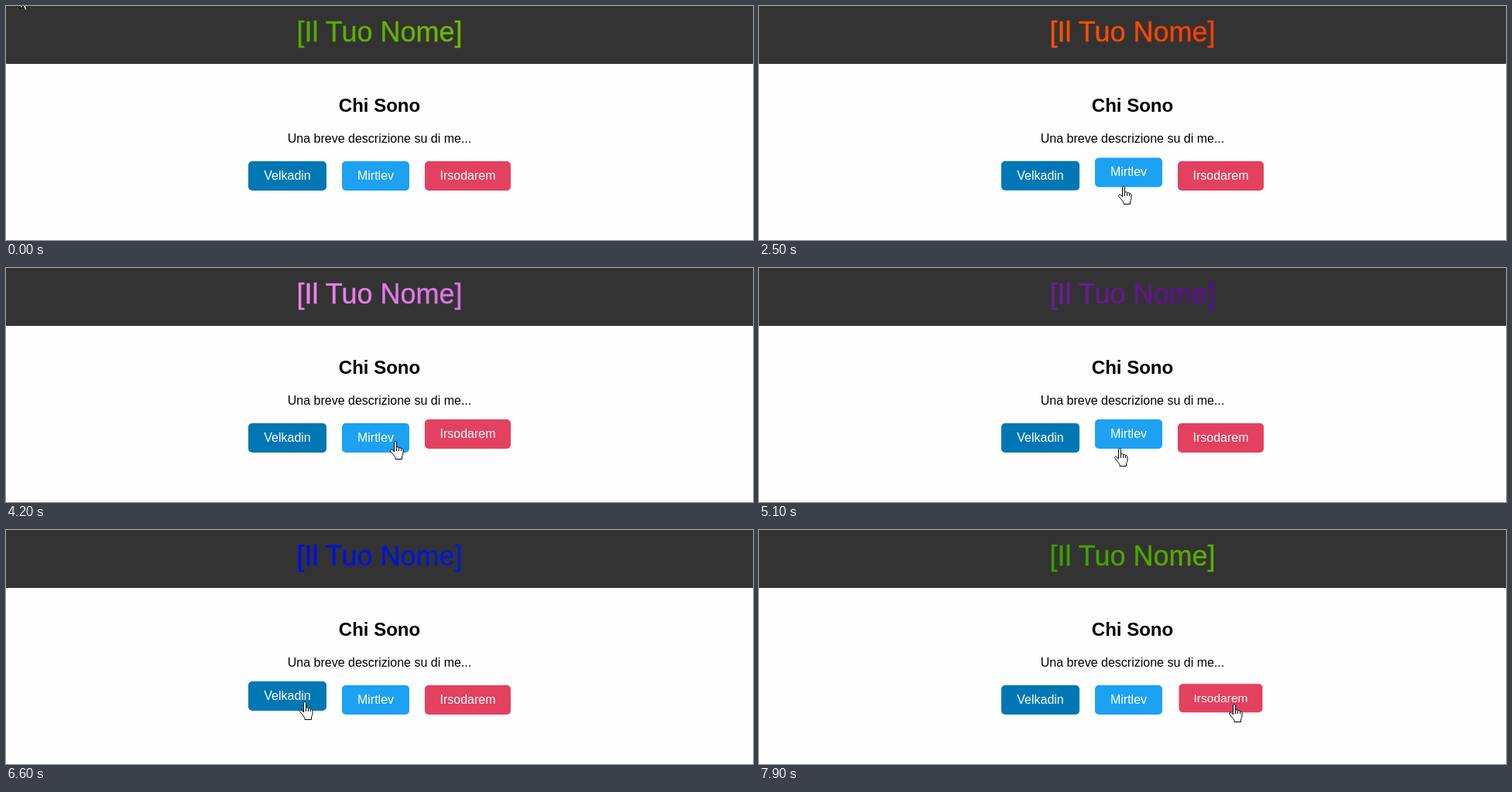
Write an HTML page that moves like this. It is 965 px wide and 303 px high and loops after 8000 ms.

```html
<!DOCTYPE html>
<html lang="it">
<head>
<meta charset="utf-8">
<title>Chi Sono</title>
<style>
  html, body { margin: 0; width: 100%; height: 100%; overflow: hidden; background: #fefefe; }
  svg { display: block; width: 965px; height: 303px; }
  text { font-family: "Liberation Sans", Arial, sans-serif; text-anchor: middle; }
  .title { font-size: 36px; fill: url(#rainbow); stroke: url(#rainbow); stroke-width: .4; }
  .button text { font-size: 16px; fill: #fff; }
  .cursor path { fill: #fff; stroke: #000; stroke-linejoin: round; }
</style>
</head>
<body>
<svg viewBox="0 0 965 303">
  <defs>
    <linearGradient id="rainbow" gradientUnits="userSpaceOnUse" spreadMethod="repeat" y1="0" y2="0"></linearGradient>
  </defs>
  <rect width="965" height="75" fill="#333"/>
  <text class="title" x="482.5" y="46">[Il Tuo Nome]</text>
  <text x="482.5" y="137" font-size="24" font-weight="bold">Chi Sono</text>
  <text x="482.5" y="177" font-size="16">Una breve descrizione su di me...</text>
  <g id="buttons"></g>
  <g class="cursor" id="arrow">
    <path d="M.5 .5V16.5L4.2 13 6.7 18.7 9.2 17.6 6.8 12H11.7Z"/>
  </g>
  <g class="cursor" id="hand">
    <path d="M5.5 14V2.2C5.5 -.1 8.5 -.1 8.5 2.2V8.5C9 7.3 11.5 7.6 11.5 9.3 12 8 14.5 8.5 14.5 10.2 15 9.2 17 10 17 11.5V15.5C17 18 15.5 19 15.5 21V23.5H7V21.5C6 19.5 2 15 .8 13.2 0 11.5 2 10.2 3.5 11.8Z"/>
    <path d="M8.5 8.5V13M11.5 9.3V13M14.5 10.2V13"/>
  </g>
</svg>
<script>
const NS = "http://www.w3.org/2000/svg";
const LOOP = 8000, STEP = 100, TRANSITION = 300, HOVER_LAG = 50;
const COLORS = ["green", "yellow", "orange", "red", "violet", "indigo", "blue", "green"];
const SPAN = COLORS.length - 1, STOP_WIDTH = 1600;
const BUTTON_Y = 220, BUTTON_HEIGHT = 38, GAP = 20;

// Button states
const REST = { y: 0, scale: 1 }, HOVER = { y: -5, scale: 1 }, PRESS = { y: 0, scale: 0.95 };

const buttons = [
  { label: "Velkadin", width: 101, color: "#0077b5" },
  { label: "Mirtlev", width: 87, color: "#1da1f2", press: [5340, 5680] },
  { label: "Irsodarem", width: 111, color: "#e4405f", press: [7805, LOOP] }
];

// Pointer moves; it rests between them
const START = [18, -13];
const moves = [
  { from: 0, to: 600, at: [175, 204] },
  { from: 600, to: 900, at: [220, 178] },
  { from: 1000, to: 1500, at: [395, 227] },
  { from: 2150, to: 2350, at: [470, 233] },
  { from: 2900, to: 3400, at: [590, 225] },
  { from: 4040, to: 4330, at: [438, 224] },
  { from: 4500, to: 5300, at: [470, 235] },
  { from: 5340, to: 5560, at: [470, 272] },
  { from: 5900, to: 6550, at: [385, 222] },
  { from: 6820, to: 7060, at: [513, 218] },
  { from: 7130, to: 7450, at: [613, 225] }
];

const $ = id => document.getElementById(id);
const clamp = x => Math.min(1, Math.max(0, x));
const smooth = x => x * x * (3 - 2 * x);

function add(parent, tag, attrs, text = "") {
  const el = document.createElementNS(NS, tag);
  for (const name in attrs) el.setAttribute(name, attrs[name]);
  el.textContent = text;
  return parent.appendChild(el);
}

// The CSS "ease" curve: cubic-bezier(.25, .1, .25, 1)
function ease(x) {
  const bezier = (a, b, u) => 3 * a * u * (1 - u) ** 2 + 3 * b * u * u * (1 - u) + u ** 3;
  let low = 0, high = 1;
  for (let i = 0; i < 20; i++) {
    const mid = (low + high) / 2;
    if (bezier(0.25, 0.25, mid) < x) low = mid; else high = mid;
  }
  return bezier(0.1, 1, low);
}

function pointerAt(t) {
  let [x, y] = START;
  for (const { from, to, at } of moves) {
    const k = smooth(clamp((t - from) / (to - from)));
    x += (at[0] - x) * k;
    y += (at[1] - y) * k;
  }
  return [Math.round(x), Math.round(y)];
}

function isOver(b, [x, y]) {
  return Math.abs(x - b.center) <= b.width / 2 && Math.abs(y - BUTTON_Y) <= BUTTON_HEIGHT / 2;
}

function targetState(b, t) {
  if (b.press && t >= b.press[0] && t < b.press[1]) return PRESS;
  return isOver(b, pointerAt(t - HOVER_LAG)) ? HOVER : REST;
}

// Follow the pointer once to find when each button changes state
function findChanges(b) {
  const changes = [];
  let last = REST;
  for (let t = 0; t < LOOP; t += 5) {
    const next = targetState(b, t);
    if (next !== last) changes.push({ t, last, next });
    last = next;
  }
  return changes;
}

function stateAt(b, t) {
  let { y, scale } = REST;
  for (const c of b.changes.filter(c => c.t < t)) {
    const k = ease(clamp((t - c.t) / TRANSITION));
    y += (c.next.y - c.last.y) * k;
    scale += (c.next.scale - c.last.scale) * k;
  }
  return { y, scale };
}

COLORS.forEach((color, i) => add($("rainbow"), "stop", { offset: i / SPAN, "stop-color": color }));

let left = 313;
for (const b of buttons) {
  b.center = left + b.width / 2;
  left += b.width + GAP;
  b.changes = findChanges(b);
  b.el = add($("buttons"), "g", { class: "button" });
  add(b.el, "rect", {
    x: -b.width / 2, y: -BUTTON_HEIGHT / 2, width: b.width, height: BUTTON_HEIGHT, rx: 5, fill: b.color
  });
  add(b.el, "text", { y: 5 }, b.label);
}

function render(t) {
  const x1 = 482.5 - (0.38 + SPAN * t / LOOP) * STOP_WIDTH;
  $("rainbow").setAttribute("x1", x1);
  $("rainbow").setAttribute("x2", x1 + SPAN * STOP_WIDTH);

  for (const b of buttons) {
    const { y, scale } = stateAt(b, t);
    b.el.setAttribute("transform", `translate(${b.center} ${BUTTON_Y + y}) scale(${scale})`);
  }

  const [x, y] = pointerAt(t);
  const over = buttons.some(b => isOver(b, [x, y]));
  $("arrow").setAttribute("transform", `translate(${x} ${y})`);
  $("hand").setAttribute("transform", `translate(${x - 6} ${y})`);
  $("arrow").setAttribute("visibility", over ? "hidden" : "visible");
  $("hand").setAttribute("visibility", over ? "visible" : "hidden");
}

const origin = performance.now();

function tick() {
  const elapsed = (performance.now() - origin) % LOOP;
  render(Math.floor(elapsed / STEP) * STEP);
  requestAnimationFrame(tick);
}
tick();
</script>
</body>
</html>
```
